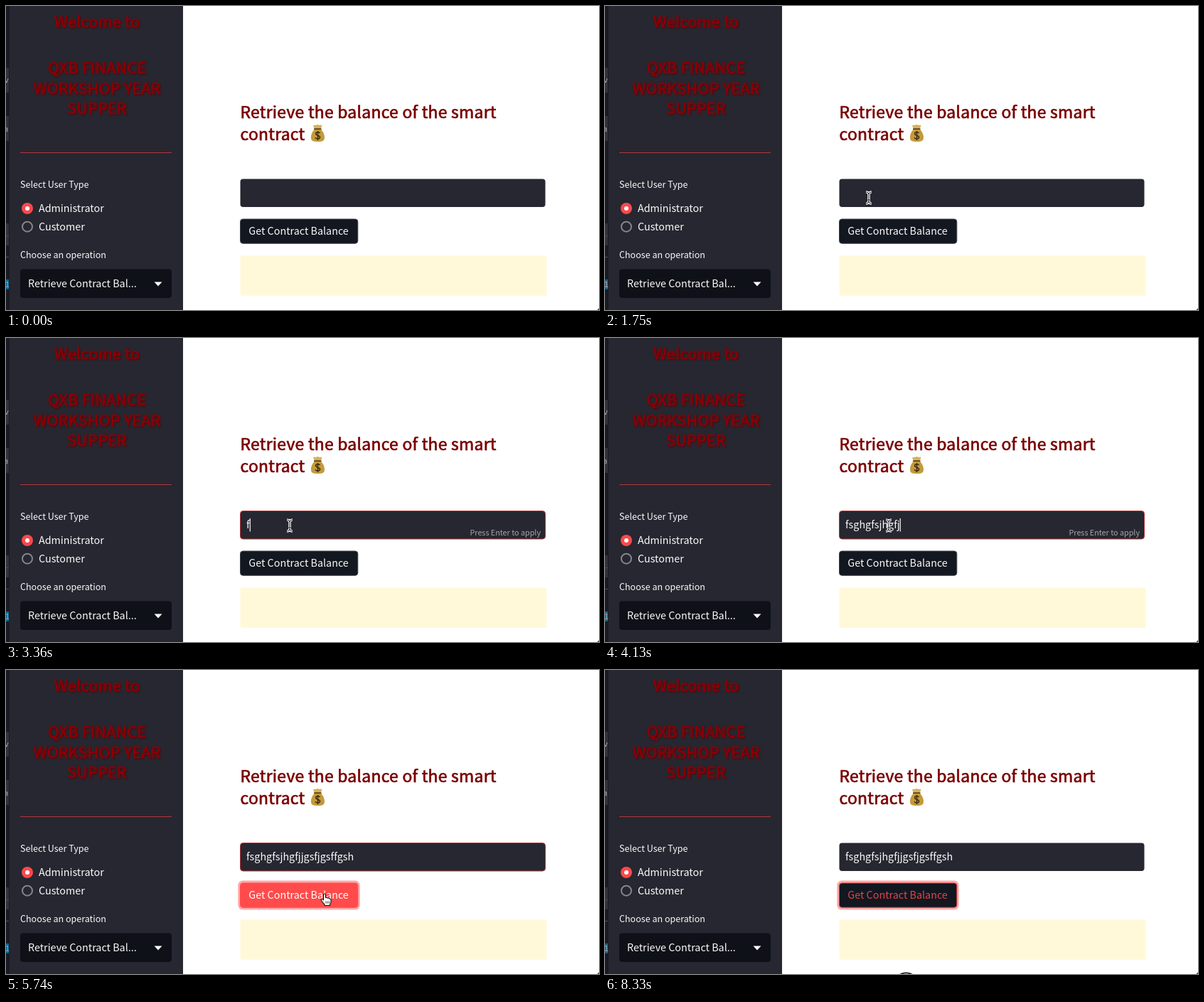
These frames come from a looping animation (834x428 px, 8.4 s). An HTML page:

```html
<!DOCTYPE html>
<html lang="en">
<head>
<meta charset="utf-8">
<title>Contract balance</title>
<style>
  html, body { margin: 0; width: 100%; height: 100%; overflow: hidden; background: #fff; }
  svg { display: block; width: 834px; height: 428px; }
  text {
    font: 14.33px "Noto Sans CJK JP", "Noto Sans CJK SC", "Noto Sans", sans-serif;
    font-variant-ligatures: none;
    fill: #fafafa;
  }
  .label { font-size: 12.54px; }
  .hint { font-size: 10.75px; fill: #a5a6aa; text-anchor: end; }
  .title { font-size: 22.9px; fill: #7a0000; stroke: #7a0000; stroke-width: .7px; letter-spacing: .27px; }
  .brand text { font-size: 21.5px; fill: #8b0006; stroke: #8b0006; stroke-width: .65px; letter-spacing: .27px; text-anchor: middle; }
  .brand { filter: drop-shadow(1.5px 1.5px 1.2px #5c0008); }
  .edge text { font-size: 11px; fill: #a9abb3; }

  #field { fill: #262730; stroke: none; }
  .focus #field { stroke: #b03337; }
  #caret, #hint { visibility: hidden; }
  .focus #caret, .typed #hint { visibility: visible; }

  #ring { fill: #ffa8a8; visibility: hidden; }
  #box { fill: #131720; stroke: #3c4049; }
  .hover #box, .done #box { stroke: #d8383c; }
  .hover #caption, .done #caption { fill: #e0444a; }
  .press #box { fill: #ff4b4b; stroke: #ff4b4b; }
  .press #caption { fill: #fff; }
  .press #ring, .done #ring { visibility: visible; }
  .cursor { visibility: hidden; }
</style>
</head>
<body>
<svg id="stage" viewBox="0 0 834 428">
  <rect width="834" height="428" fill="#fff"/>
  <path d="M834 424.5V428H830.5Q833.6 427.6 834 424.5Z" fill="#222"/>

  <g class="edge">
    <rect width="5" height="428" fill="#191b24"/>
    <path d="M0 87H4V122H0ZM0 155H4V190H0ZM0 306H4V337H0Z" fill="#30323c"/>
    <rect y="385" width="4" height="14" fill="#0b6a94"/>
    <path d="M0 323.5H4M0 353.5H4" stroke="#4a4d57"/>
    <text x="-2" y="108">v</text>
    <text x="-3" y="177">a</text>
    <text x="-1" y="396">1</text>
  </g>

  <rect x="5" width="244" height="428" fill="#262730"/>
  <g class="brand">
    <text x="128" y="30">Welcome to</text>
    <text x="128" y="95">QXB FINANCE</text>
    <text x="128" y="123.6">WORKSHOP YEAR</text>
    <text x="128" y="152.4">SUPPER</text>
  </g>
  <path d="M20 206.5H233" stroke="#b5343a"/>

  <text class="label" x="20" y="256">Select User Type</text>
  <circle cx="30" cy="285" r="8" fill="#f9494c"/>
  <circle cx="30" cy="285" r="3" fill="#fff"/>
  <text x="46" y="290.3">Administrator</text>
  <circle cx="30" cy="310.7" r="7" fill="#262730" stroke="#84858b" stroke-width="2"/>
  <text x="46" y="316">Customer</text>

  <text class="label" x="20" y="355">Choose an operation</text>
  <rect x="20" y="370.5" width="213" height="40.5" rx="4" fill="#0e1117"/>
  <text x="31" y="396">Retrieve Contract Bal...</text>
  <path d="M208.5 388.5H219.5L214 394.5Z" fill="#fafafa"/>

  <text class="title" x="329.5" y="157.5">Retrieve the balance of the smart</text>
  <text class="title" x="329.5" y="188.5">contract</text>
  <g>
    <path d="M434.5 173C430.5 177 428.6 181.5 429 186C429.3 190 432 191 438.5 191S447.6 190 448 186C448.4 181.5 446.3 177 442.3 173Z" fill="#c39a3c"/>
    <path d="M434 173C432.5 170 431.5 168.3 433.5 167.6Q435.5 168.4 437 167.2Q439 166.5 440.5 167.8Q442.5 168 444 167.6Q445 169 442.6 173Z" fill="#d4b25c"/>
    <path d="M433.8 173.2H442.8" stroke="#5c431a" stroke-width="1.8" stroke-linecap="round"/>
    <path d="M441.5 178.8C440.5 177.3 435.6 177 435.6 179.8S441.6 182 441.6 184.8S436 187.5 435 185.2M438.5 176V189" fill="none" stroke="#3d2d10" stroke-width="1.5"/>
  </g>

  <rect id="field" x="329.5" y="243.5" width="429" height="39.5" rx="4"/>
  <text id="entry" x="338" y="268"></text>
  <rect id="caret" y="254" width="1.2" height="18.5" fill="#fafafa"/>
  <text id="hint" class="hint" x="752" y="278">Press Enter to apply</text>

  <rect id="ring" x="326.3" y="296.6" width="171.4" height="41" rx="6.5"/>
  <rect id="box" x="329.5" y="300" width="165.3" height="34.3" rx="3.7"/>
  <text id="caption" x="341.3" y="322.4">Get Contract Balance</text>

  <rect x="329.5" y="351.5" width="431" height="56.5" rx="2" fill="#fff9da"/>

  <g id="arrow" class="cursor">
    <path d="M0 0V15L3.6 11.8L6 17.2L8.6 16.1L6.2 10.8H11Z" fill="#000" stroke="#fff" stroke-width="1.1"/>
  </g>
  <g id="beam" class="cursor" fill="none">
    <path id="stem" d="M-3.8 -8Q-.4 -8 0 -5.5Q.4 -8 3.8 -8M0 -6V6M-3.8 8Q-.4 8 0 5.5Q.4 8 3.8 8M-2 3H2" stroke="#fff" stroke-width="3"/>
    <use href="#stem"/>
    <path d="M-3.8 -8Q-.4 -8 0 -5.5Q.4 -8 3.8 -8M0 -6V6M-3.8 8Q-.4 8 0 5.5Q.4 8 3.8 8M-2 3H2" stroke="#15161c"/>
  </g>
  <g id="hand" class="cursor">
    <path d="M-1.5 9V1.4Q-1.4 0 0 0T1.5 1.4V5.6Q3.4 4.8 4.2 6.2Q6 5.6 6.8 7Q9 6.8 9 8.8V11.5Q8.6 13.6 7.6 15V16.5H0V15Q-3 12 -4.8 9Q-5 7.2 -3.6 7.3Q-2.6 7.6 -1.5 9Z" fill="#fff" stroke="#111" stroke-width="1.1" stroke-linejoin="round"/>
    <path d="M2 10.5V13.6M4.2 10.5V13.6M6.4 10.5V13.6" stroke="#111" stroke-width=".8"/>
  </g>
  <circle id="dial" class="cursor" cx="423.5" cy="444" r="17.6" fill="#fff" stroke="#111" stroke-width="1.8"/>
</svg>

<script>
  const LOOP = 8400, STEP = 70;
  const WORDS = "fsghgfsjhgfjjgsfjgsffgsh";
  const $ = id => document.getElementById(id);
  const [stage, entry, caret, dial] = ["stage", "entry", "caret", "dial"].map($);
  const cursors = ["arrow", "beam", "hand"].map($);

  // Pointer path: time, x, y
  const path = [
    [210, 424, 430], [280, 420, 392], [560, 405, 337], [910, 405, 337],
    [1400, 369, 277], [1470, 369, 277], [1540, 369, 269], [1610, 369, 269],
    [1680, 371, 270], [2800, 371, 270], [2940, 397, 260], [3010, 399, 264],
    [4200, 399, 264], [4550, 458, 313], [4900, 458, 313], [5390, 448, 315],
    [6020, 448, 315], [6440, 421, 431]
  ];

  function pointer(t) {
    const i = path.findIndex(p => p[0] > t);
    if (i < 1) return null;
    const [t0, x0, y0] = path[i - 1], [t1, x1, y1] = path[i];
    const k = (t - t0) / (t1 - t0), e = k * k * (3 - 2 * k);
    return { x: x0 + (x1 - x0) * e, y: y0 + (y1 - y0) * e };
  }

  function typed(t) {
    if (t < 3360) return 0;
    return t <= 4690 ? 1 + Math.floor((t - 3360) / STEP)
                     : Math.min(WORDS.length, 20 + Math.round((t - 4690) / 52));
  }

  function draw(t) {
    const count = typed(t), p = pointer(t);
    const over = p && t > 3150 && p.y > 299 && p.y < 335;
    const set = (name, on) => stage.classList.toggle(name, Boolean(on));
    set("focus", t >= 3150 && t < 5880);
    set("typed", count && t < 5600);
    set("hover", over);
    set("press", t >= 5600 && t < 5880);
    set("done", t >= 5880);

    entry.textContent = WORDS.slice(0, count);
    caret.setAttribute("x", 338 + (count ? entry.getComputedTextLength() : 0));
    caret.style.display = t < 5600 ? "" : "none";

    const shape = t < 1680 ? 0 : p && p.y < 290 ? 1 : over ? 2 : 0;
    cursors.forEach((c, i) => {
      c.style.visibility = p && i === shape ? "visible" : "hidden";
      if (p) c.setAttribute("transform", `translate(${p.x} ${p.y})`);
    });
    dial.style.visibility = t >= 8330 ? "visible" : "hidden";
  }

  const start = performance.now();
  function tick() {
    const t = (performance.now() - start) % LOOP;
    draw(Math.floor(t / STEP) * STEP);
    requestAnimationFrame(tick);
  }
  tick();
</script>
</body>
</html>
```
